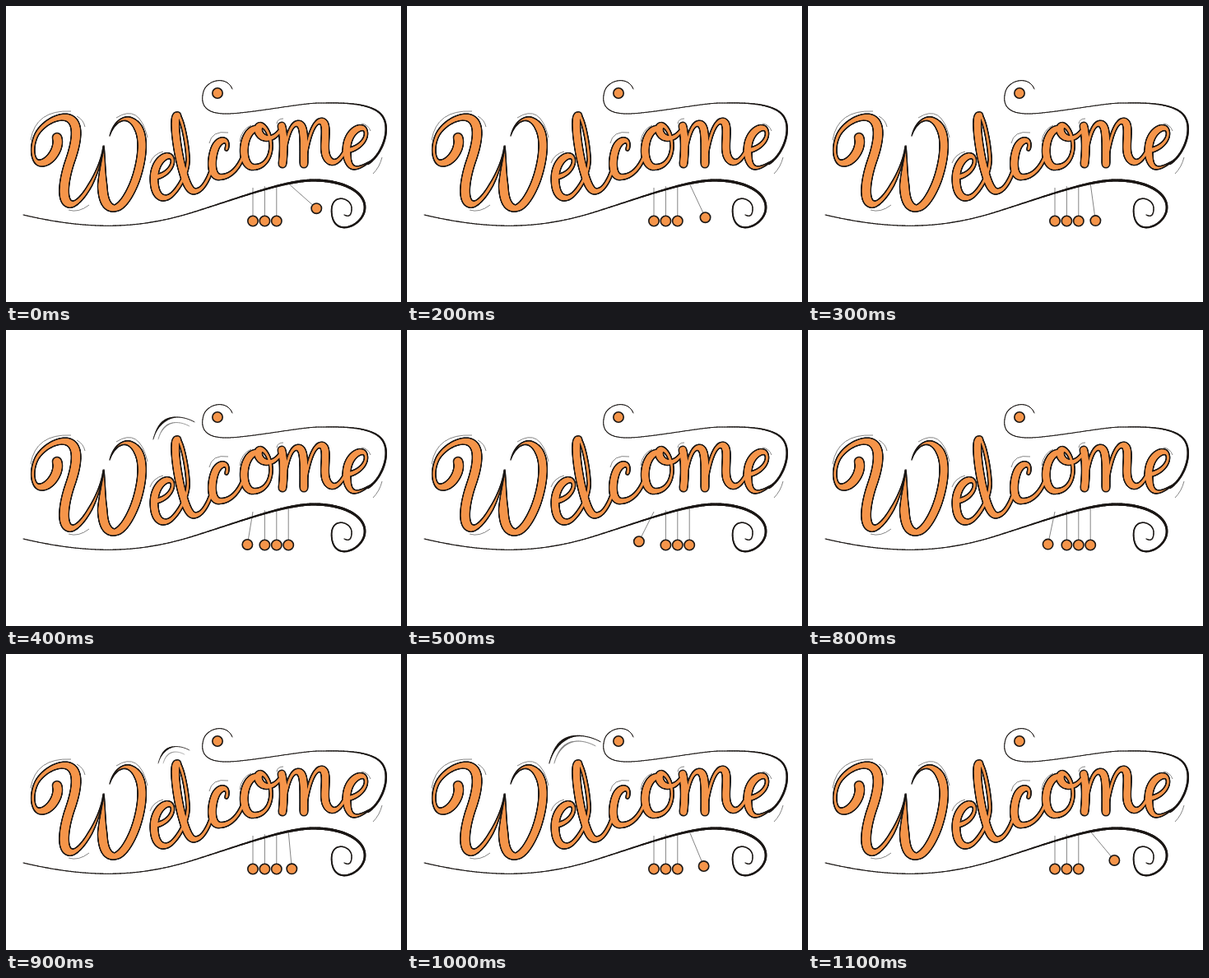
Animation, 480 px wide and 360 px high, one loop 1.15 s. Source, as an HTML page with a canvas:

```html
<!DOCTYPE html>
<html lang="en">
<head>
<meta charset="utf-8">
<title>Welcome</title>
<style>
html, body { margin: 0; width: 100%; height: 100%; overflow: hidden; background: #fff; }
canvas { display: block; }
</style>
</head>
<body>
<canvas id="stage" width="480" height="360"></canvas>
<script>
const INK = '#1b1715', ORANGE = '#f5954a', GREY = '#858585';
const LOOP = 1150, STEP = 50;
const KNOCK_LEFT = 345, KNOCK_RIGHT = 870;

const stage = document.getElementById('stage').getContext('2d');
const artwork = document.createElement('canvas');
artwork.width = 480;
artwork.height = 360;
const art = artwork.getContext('2d');

// A pen gives the radius for the direction dy, the place s and the path length.
// The nib presses on the way down and lifts on the way up.
const nib = (thick, taperStart, taperEnd) => (dy, s, length) => {
  const ends = Math.min(1, taperStart ? s / 50 : 1, taperEnd ? (length - s) / 50 : 1);
  return .6 + (2.2 + (thick - 2.8) * (1 + dy) / 2) * ends;
};
const swell = (thin, thick, peak) => (dy, s, length) =>
  thin + (thick - thin) * Math.exp(-(((s / length - peak) / .2) ** 2));

const small = nib(5.5), joined = nib(5.5, false, true);
const letters = [
  // W
  ['M62 160C66 172 54 191 42 191C30 191 30 165 40 152S66 133 75 136' +
   'C90 141 86 165 78 188S66 240 79 241S116 200 118 170', nib(6.4, false, true)],
  ['M119 170C119 195 110 244 131 246', nib(6.4, true)],
  ['M126 158C131 141 142 135 150 138C176 150 162 200 156 215S140 247 130 246', nib(5.8, true)],
  // el
  ['M181 208C198 206 206 190 201 184S180 188 180 210S190 236 198 232S222 205 221 185' +
   'S213 131 208 133S207 172 214 198S226 228 234 224S248 205 251 195', small],
  // c
  ['M268 174C272 162 262 160 256 169S246 208 260 208S284 195 289 180', small],
  // o
  ['M304 149C286 152 284 196 301 196S326 176 320 158S304 144 307 153S324 166 334 150', small],
  // m
  ['M335 146Q339 165 336 192', small],
  ['M337 188C340 165 345 143 354 143S362 160 362 192', small],
  ['M363 188C367 160 374 139 383 140S386 165 388 178S402 198 413 174', small],
  // e
  ['M412 176C428 175 440 162 437 152S413 152 414 177S427 198 436 193S447 186 450 182', joined]
];

const swashes = [
  ['M440 192C458 180 470 146 455 131S400 118 380 118S300 130 270 131S236 118 240 104S268 84 275 101',
   swell(.5, 1.3, .08)],
  ['M21 254C110 275 170 269 230 250S340 212 374 212S437 225 436 246S400 282 396 254' +
   'S420 232 420 246S412 254 411 254', swell(.55, 1.6, .68)]
];

const accents = 'M30 163Q36 126 79 128M86 134Q94 138 96 147M134 136Q162 118 172 160' +
  'M153 207Q152 224 144 235M76 248Q88 252 101 242M175 191Q179 180 191 177' +
  'M247 167Q250 151 270 154M284 165Q286 150 298 145M329 143Q330 137 337 137' +
  'M432 143Q440 144 443 152M457 184Q454 196 446 204';

const tracer = document.createElementNS('http://www.w3.org/2000/svg', 'path');

// Sweeps a pen of changing width along a path; inset shrinks it.
function brush(ctx, d, pen, color, inset = 0) {
  tracer.setAttribute('d', d);
  const length = tracer.getTotalLength(), steps = Math.ceil(length / 1.5);
  ctx.strokeStyle = color;
  ctx.lineCap = 'round';
  let p = tracer.getPointAtLength(0);
  for (let n = 1; n <= steps; n++) {
    const s = n / steps * length, q = tracer.getPointAtLength(s);
    const dy = (q.y - p.y) / Math.hypot(q.x - p.x, q.y - p.y);
    const r = pen(dy, s, length) - inset;
    if (r > 0) {
      ctx.lineWidth = 2 * r;
      ctx.beginPath();
      ctx.moveTo(p.x, p.y);
      ctx.lineTo(q.x, q.y);
      ctx.stroke();
    }
    p = q;
  }
}

function ball(ctx, x, y) {
  ctx.beginPath();
  ctx.arc(x, y, 6.2, 0, 7);
  ctx.fillStyle = ORANGE;
  ctx.fill();
  ctx.strokeStyle = INK;
  ctx.lineWidth = 1.6;
  ctx.stroke();
}

function drawArtwork() {
  art.strokeStyle = GREY;
  art.stroke(new Path2D(accents));
  swashes.forEach(([d, pen]) => brush(art, d, pen, INK));
  letters.forEach(([d, pen]) => brush(art, d, pen, INK));
  letters.forEach(([d, pen]) => brush(art, d, pen, ORANGE, 1.6));
  ball(art, 257, 106);
}

// Out and back at an even speed; zero outside the interval.
function swing(t, from, to, peak) {
  const u = (t - from) / (to - from);
  return peak * Math.max(0, 1 - Math.abs(2 * u - 1));
}

function pendulum(i, degrees) {
  const x = 300 + i * 14.4, top = 221 - i * 1.7, length = 261.5 - top;
  const a = degrees * Math.PI / 180;
  const bx = x + length * Math.sin(a), by = top + length * Math.cos(a);
  stage.strokeStyle = GREY;
  stage.lineWidth = 1;
  stage.beginPath();
  stage.moveTo(x, top);
  stage.lineTo(bx, by);
  stage.stroke();
  ball(stage, bx, by);
}

// Two sound arcs spread after each knock, the second one a step behind.
function knock(age) {
  if (age < 0 || age > 140) return;
  [INK, GREY].forEach((color, i) => {
    const scale = 1 + .32 * (Math.floor(age / STEP) - i);
    stage.save();
    stage.translate(204, 133);
    stage.scale(scale, scale);
    brush(stage, 'M-19 0C-12 -26 8 -22 19 -16', swell(.3, 1 - i * .3, .4), color);
    stage.restore();
  });
}

function draw(now) {
  const t = Math.floor(now % LOOP / STEP) * STEP;
  const sinceRight = (t - KNOCK_RIGHT + LOOP) % LOOP;
  const right = swing(sinceRight, 0, LOOP + KNOCK_LEFT - KNOCK_RIGHT, 54);
  const left = swing(t, KNOCK_LEFT, KNOCK_RIGHT, -45);
  stage.fillStyle = '#fff';
  stage.fillRect(0, 0, 480, 360);
  [left, 0, 0, right].forEach((degrees, i) => pendulum(i, degrees));
  stage.drawImage(artwork, 0, 0);
  knock(t - KNOCK_LEFT);
  knock(t - KNOCK_RIGHT);
}

drawArtwork();
const start = performance.now();
function tick() {
  draw(performance.now() - start);
  requestAnimationFrame(tick);
}
tick();
</script>
</body>
</html>
```
